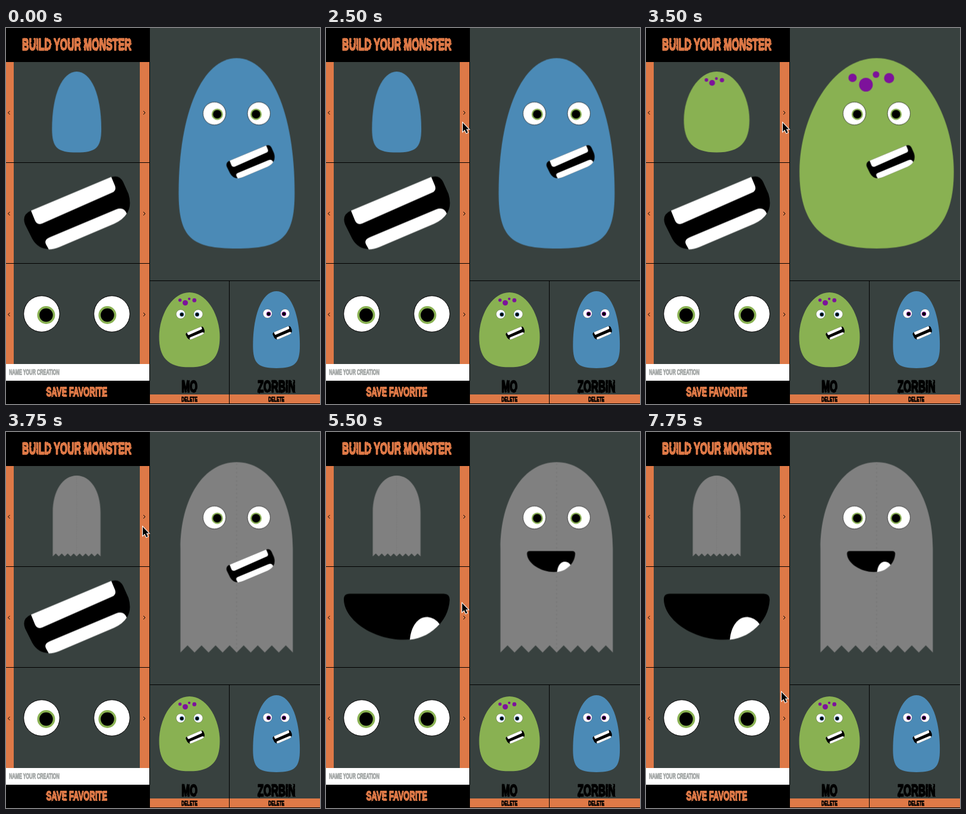
Animation, 528 px wide and 630 px high, one loop 8 s. Source, as an HTML page without scripts:

```html
<!DOCTYPE html>
<html lang="en">
<head>
<meta charset="utf-8">
<title>Build your monster</title>
<style>
  html, body { margin: 0; width: 100%; height: 100%; overflow: hidden; background: #38413f; }
  svg { display: block; width: 528px; height: 630px; }

  /* one condensed heavy face for every label */
  text {
    font: 900 28px "Liberation Sans", Arial, sans-serif;
    text-anchor: middle;
    transform: scaleX(.593);
    transform-box: fill-box;
    transform-origin: center;
    stroke: currentColor;
    stroke-width: .085em;
    stroke-linejoin: round;
    fill: currentColor;
  }
  .title { font-size: 27px; }
  .save { font-size: 22px; }
  .hint { font-size: 12.4px; }
  .del { font-size: 11.5px; }
  .orange { color: #de7947; fill: #de7947; }
  .grey { color: #a3a7a6; }
  .black { color: #000; }

  .green-eye { color: #89b152; }
  .blue-eye { color: #4b8ab6; }
  .purple-eye { color: #7d129b; }

  .step { animation: 8s step-end infinite; }
  .blue-main { animation-name: blue-main; }
  .blue-pick { animation-name: blue-pick; }
  .green-main { animation-name: green-main; }
  .green-pick { animation-name: green-pick; }
  .ghost-on { animation-name: ghost-on; }
  .teeth-on { animation-name: teeth-on; }
  .smile-on { animation-name: smile-on; }
  .cursor { animation-name: cursor; }

  @keyframes blue-main { 0% { opacity: 1 } 37.5%, 100% { opacity: 0 } }
  @keyframes blue-pick { 0% { opacity: 1 } 40.625%, 100% { opacity: 0 } }
  @keyframes green-main { 0% { opacity: 0 } 37.5% { opacity: 1 } 46.875%, 100% { opacity: 0 } }
  @keyframes green-pick { 0% { opacity: 0 } 40.625% { opacity: 1 } 46.875%, 100% { opacity: 0 } }
  @keyframes ghost-on { 0% { opacity: 0 } 46.875%, 100% { opacity: 1 } }
  @keyframes teeth-on { 0% { opacity: 1 } 65.625%, 100% { opacity: 0 } }
  @keyframes smile-on { 0% { opacity: 0 } 65.625%, 100% { opacity: 1 } }
  @keyframes cursor {
    0% { opacity: 0; transform: translate(262px, 82px) }
    18.75% { opacity: 1; transform: translate(262px, 82px) }
    21.875% { opacity: 1; transform: translate(235px, 151px) }
    25% { opacity: 1; transform: translate(229px, 158px) }
    56.25% { opacity: 1; transform: translate(229px, 261px) }
    59.375% { opacity: 1; transform: translate(228px, 285px) }
    62.5% { opacity: 1; transform: translate(228px, 286px) }
    90.625% { opacity: 1; transform: translate(228px, 360px) }
    93.75% { opacity: 1; transform: translate(227px, 428px) }
    96.875%, 100% { opacity: 1; transform: translate(227px, 435px) }
  }
</style>
</head>
<body>
<svg viewBox="0 0 528 630" xmlns="http://www.w3.org/2000/svg">
  <defs>
    <filter id="rough" x="-5%" y="-15%" width="110%" height="130%" color-interpolation-filters="sRGB">
      <feTurbulence type="fractalNoise" baseFrequency=".2" seed="4"/>
      <feDisplacementMap in="SourceGraphic" scale="2.5" xChannelSelector="R" yChannelSelector="G"/>
    </filter>

    <!-- bodies: top centre at 0,0 -->
    <path id="blue" fill="#4b8ab6" d="M0 0C-57 0-97.5 90-97.5 226C-97.5 302-75 319 0 319S97.5 302 97.5 226C97.5 90 57 0 0 0Z"/>
    <g id="green">
      <path fill="#89b152" d="M0 0C-75 0-129.75 97-129.75 190C-129.75 275-95 319 0 319S129.75 275 129.75 190C129.75 97 75 0 0 0Z"/>
      <g fill="#7d129b">
        <circle cx="-40.5" cy="33" r="7"/>
        <circle cx="-18" cy="44.5" r="11.5"/>
        <circle cx="-1" cy="27.5" r="5.5"/>
        <circle cx="21" cy="33.5" r="8.5"/>
      </g>
    </g>
    <g id="ghost">
      <path fill="#808080" d="M-94.5 319V145C-94.5 60-55 0 0 0S94.5 60 94.5 145V319l-11.8-12-11.8 12-11.8-12-11.8 12-11.8-12-11.8 12-11.8-12L0 319l-11.8-12-11.8 12-11.8-12-11.8 12-11.8-12-11.8 12-11.8-12Z"/>
      <path d="M0 2V317" stroke="#747474" stroke-dasharray="3 4"/>
    </g>

    <!-- faces: centred on 0,0 -->
    <g id="eye">
      <circle r="30.3" fill="#fff" stroke="#000"/>
      <circle cx="7.5" cy="2" r="15" fill="currentColor"/>
      <circle cx="7.5" cy="2" r="11.3"/>
    </g>
    <g id="eyes">
      <use href="#eye" x="-59"/>
      <use href="#eye" transform="translate(59) scale(-1 1)"/>
    </g>
    <g id="teeth" transform="translate(-119 -309.5)">
      <path d="M42 306L174 251Q190 244 197 258L206 278Q212 298 203 311Q197 321 182 328L90 367Q58 378 44 353L32 329Q26 313 42 306Z"/>
      <g fill="#fff">
        <path d="M42 306L177 249.5L183.5 265Q186 273 178 276L61 327.5Q52 331 48.5 322Z"/>
        <path d="M67.5 363Q63 355 74 350.5L185 304Q198 299 203 311Q197 321 182 328L90 367Q80 371 72 371Z"/>
      </g>
    </g>
    <g id="smile" transform="translate(-119 -309.5)">
      <path d="M40 271H198Q208 271 208 281C206 320 172 348 130 348C80 348 32 316 30 282Q29 271 40 271Z"/>
      <path fill="#fff" d="M141 348C143 325 155 309 171 310Q183 311 191 322C178 337 160 346 141 348Z"/>
    </g>

    <g id="bars">
      <path class="orange" d="M0 0H13V168H0ZM225 0H241V168H225Z"/>
      <path d="M6.5 82L3.5 85L6.5 88M231 82L234 85L231 88" fill="none" stroke="#000"/>
    </g>
  </defs>

  <rect width="528" height="630" fill="#38413f"/>

  <!-- part pickers -->
  <use href="#bars" y="57"/>
  <use href="#bars" y="226"/>
  <use href="#bars" y="395"/>
  <g transform="translate(118.8 73) scale(.425)">
    <use href="#blue" class="step blue-pick"/>
    <use href="#green" class="step green-pick"/>
    <use href="#ghost" class="step ghost-on"/>
  </g>
  <g transform="translate(119 309.5)">
    <use href="#teeth" class="step teeth-on"/>
    <use href="#smile" class="step smile-on"/>
  </g>
  <use href="#eyes" class="green-eye" x="119" y="479"/>

  <!-- main monster -->
  <g transform="translate(387.8 50.5)">
    <use href="#blue" class="step blue-main"/>
    <use href="#green" class="step green-main"/>
    <use href="#ghost" class="step ghost-on"/>
  </g>
  <use href="#eyes" class="green-eye" transform="translate(387.8 143.2) scale(.633)"/>
  <g transform="translate(411 224) scale(.455)"><use href="#teeth" class="step teeth-on"/></g>
  <g transform="translate(378.5 217) scale(.455)"><use href="#smile" class="step smile-on"/></g>

  <!-- favorites -->
  <use href="#green" transform="translate(308.5 443) scale(.393)"/>
  <use href="#eyes" class="blue-eye" transform="translate(308.5 479.5) scale(.25)"/>
  <use href="#teeth" transform="translate(318 511) scale(.178)"/>
  <use href="#blue" transform="translate(454.7 441) scale(.404)"/>
  <use href="#eyes" class="purple-eye" transform="translate(454.5 478.5) scale(.25)"/>
  <use href="#teeth" transform="translate(464.5 510.5) scale(.182)"/>

  <!-- frame and lines -->
  <rect width="241" height="57"/>
  <rect y="563" width="241" height="28" fill="#fff"/>
  <rect y="591" width="241" height="39"/>
  <rect class="orange" x="242" y="614" width="286" height="15"/>
  <path d="M0 225.5H241M0 394.5H241M241.5 0V630M242 423.5H528M375.5 423V630M242 629.5H528" stroke="#000"/>

  <!-- labels -->
  <g filter="url(#rough)">
    <text class="title orange" x="119" y="37">BUILD YOUR MONSTER</text>
    <text class="save orange" x="119" y="617.5">SAVE FAVORITE</text>
    <text class="black" x="308.5" y="610">MO</text>
    <text class="black" x="454.7" y="610">ZORBIN</text>
  </g>
  <text class="hint grey" x="47.5" y="581.5">NAME YOUR CREATION</text>
  <text class="del black" x="308.5" y="626">DELETE</text>
  <text class="del black" x="454.7" y="626">DELETE</text>

  <g class="step cursor">
    <path d="M1 1V15.5L4.3 12.5L7 18.2L9.5 17L6.8 11.5H11.2Z" stroke="#fff" stroke-width="2" paint-order="stroke"/>
  </g>
</svg>
</body>
</html>
```
